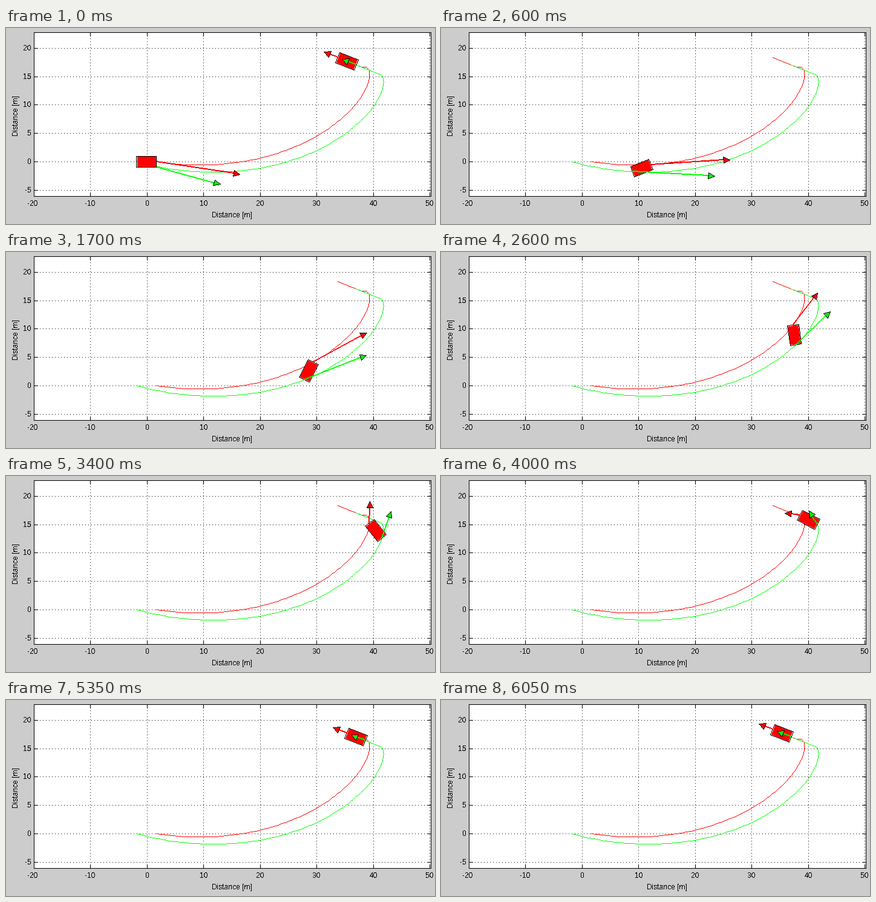
A matplotlib script that plays this animation: 709x323 px, repeating every 6100 ms.

```python
import numpy as np
import matplotlib.pyplot as plt
from matplotlib.animation import FuncAnimation
from matplotlib.patches import PathPatch, Polygon, Rectangle
from matplotlib.path import Path

W, H, DPI = 709, 323, 64
PX = 72 / DPI  # one pixel in points
FRAMES, INTERVAL = 122, 50
RED, GREEN = "#ff0000", "#00ff00"
LEFT, TOP, RIGHT, BOTTOM = 46, 7, 702, 277

# Motion in pixels and frames, y pointing down
LENGTH, WIDTH = 32.7, 18.7
START = np.array([231.8, 220])
DRIFT = np.array([3.79, 1.93])  # steady part of the velocity
TURN = np.radians(1.92)         # heading change per frame
THRUST = 160 * TURN             # part of the velocity along the heading
TURN_END = 82.4
EXIT_SPEED = 1.16

plt.rcParams.update({
    "font.family": "Liberation Sans",
    "font.size": 12 * PX,
    "text.antialiased": False,
    "toolbar": "None",
})


def rotate(angle):
    return np.array([np.cos(angle), -np.sin(angle)])


def motion(t):
    """Centre, velocity, heading and turn rate: a drifting arc, then a line."""
    s = min(t, TURN_END)
    a = TURN * s
    arc = np.array([np.sin(a), np.cos(a) - 1]) * THRUST / TURN
    centre = START + DRIFT * s + arc
    if t < TURN_END:
        return centre, DRIFT + THRUST * rotate(a), a, TURN
    velocity = EXIT_SPEED * rotate(a)
    return centre + velocity * (t - s), velocity, a, 0


def axle(t, side):
    """Position and velocity of the front (side 1) or rear (side -1) axle."""
    centre, velocity, a, spin = motion(t)
    arm = side * LENGTH / 2
    return (centre + arm * rotate(a),
            velocity + arm * spin * rotate(a + np.pi / 2))


def trace(points, width=1):
    """Pixels of a hard-edged polyline."""
    p = np.floor(np.asarray(points, float) + 0.5)
    out = []
    for a, b in zip(p, p[1:]):
        d = np.abs(b - a)
        run = np.floor(np.linspace(a, b, int(d.max()) + 1) + 0.5)
        for i in range(width):
            step = np.zeros(2)
            step[d.argmin()] = i
            out.append(run - step)
    return np.concatenate(out)


def squares(pixels):
    corners = np.array([(-1, -1), (1, -1), (1, 1), (-1, 1), (-1, -1)]) / 2
    verts = (pixels[:, None] + corners).reshape(-1, 2)
    codes = [Path.MOVETO] + [Path.LINETO] * 3 + [Path.CLOSEPOLY]
    return Path(verts, codes * len(pixels))


fig = plt.figure(figsize=(W / DPI, H / DPI), dpi=DPI, facecolor="#cccccc")
ax = fig.add_axes([0, 0, 1, 1])
ax.set_xlim(-0.5, W - 0.5)
ax.set_ylim(H - 0.5, -0.5)
ax.axis("off")


def ink(pixels, color="black", z=2):
    return ax.add_patch(PathPatch(squares(pixels), fc=color, lw=0, zorder=z,
                                  snap=False))


def dots(x, y):
    ink(np.column_stack([a.ravel() for a in np.broadcast_arrays(x, y)]), z=1)


def draw_axes():
    ax.add_patch(Rectangle((LEFT, TOP), RIGHT - LEFT, BOTTOM - TOP,
                           fc="white", lw=0, zorder=0))
    ink(trace([(LEFT, TOP), (RIGHT, TOP), (RIGHT, BOTTOM), (LEFT, BOTTOM),
               (LEFT, TOP)]))
    for v in range(-20, 51, 10):
        x = int(233 + 9.35 * v)
        if v > -20:
            dots(x, np.arange(BOTTOM, TOP, -5))
            ink(trace([(x, BOTTOM), (x, BOTTOM - 6)]))
            ink(trace([(x, TOP), (x, TOP + 6)]))
        ax.text(x - (2 if v == -20 else 0), 293, str(v), ha="center",
                va="baseline")
    for v in range(-5, 21, 5):
        y = round(220 - 9.36 * v)
        dots(np.arange(LEFT, RIGHT, 5), y)
        ink(trace([(LEFT, y), (LEFT + 6, y)]))
        ink(trace([(RIGHT, y), (RIGHT - 6, y)]))
        ax.text(41.5, y + 4, str(v), ha="right", va="baseline")
    ax.text(372.5, 312, "Distance [m]", ha="center", va="baseline")
    ax.text(23, 144.5, "Distance [m]", rotation=90, ha="right", va="center")


class Outlined:
    """Filled polygon with a one-pixel black edge."""

    def __init__(self, color, z):
        self.fill = ax.add_patch(Polygon(np.zeros((3, 2)), fc=color, lw=0))
        self.edge = ink(np.zeros((1, 2)))
        self.parts = [self.fill, self.edge]
        self.raise_to(z)

    def raise_to(self, z):
        self.fill.set_zorder(z)
        self.edge.set_zorder(z + 0.1)

    def set(self, corners):
        corners = np.array(corners)
        mid = corners.mean(axis=0)
        self.fill.set_xy(mid + 0.94 * (corners - mid))
        self.edge.set_path(squares(trace([*corners, corners[0]])))


class Arrow:
    HEAD, HALF = 10.5, 5
    SCALE, EXTRA = 14.25, 8

    def __init__(self, color):
        self.stem = ink(np.zeros((1, 2)), color, 4)
        self.head = Outlined(color, 5)
        self.parts = [self.stem, *self.head.parts]

    def set(self, start, velocity):
        speed = np.hypot(*velocity)
        d = velocity / speed
        n = np.array([-d[1], d[0]]) * self.HALF
        tip = start + d * (speed * self.SCALE + self.EXTRA)
        base = tip - d * self.HEAD
        self.stem.set_path(squares(trace([start, base], width=2)))
        self.head.set([tip, base + n, base - n])


class Car:
    def __init__(self):
        self.body = Outlined(RED, 3)
        self.arrows = {1: Arrow(RED), -1: Arrow(GREEN)}
        self.parts = self.body.parts + [
            p for arrow in self.arrows.values() for p in arrow.parts]

    def set(self, t):
        for side, arrow in self.arrows.items():
            arrow.set(*axle(t, side))
        centre, _, a, _ = motion(t)
        u = rotate(a) * LENGTH / 2
        n = rotate(a + np.pi / 2) * WIDTH / 2
        self.body.set([centre - u - n, centre + u - n,
                       centre + u + n, centre - u + n])

    def show(self, on):
        for p in self.parts:
            p.set_visible(on)


draw_axes()
for side, color in ((1, RED), (-1, GREEN)):
    ink(trace([axle(t, side)[0] for t in range(FRAMES - 1)]), color)
car, goal = Car(), Car()
goal.set(FRAMES - 2)


def update(k):
    car.set(max(k - 1, 0))
    car.body.raise_to(6 if k == 0 else 3)
    goal.show(k == 0)
    return car.parts + goal.parts


anim = FuncAnimation(fig, update, frames=FRAMES, interval=INTERVAL,
                     repeat=True, repeat_delay=0, blit=False)
plt.show()
```
